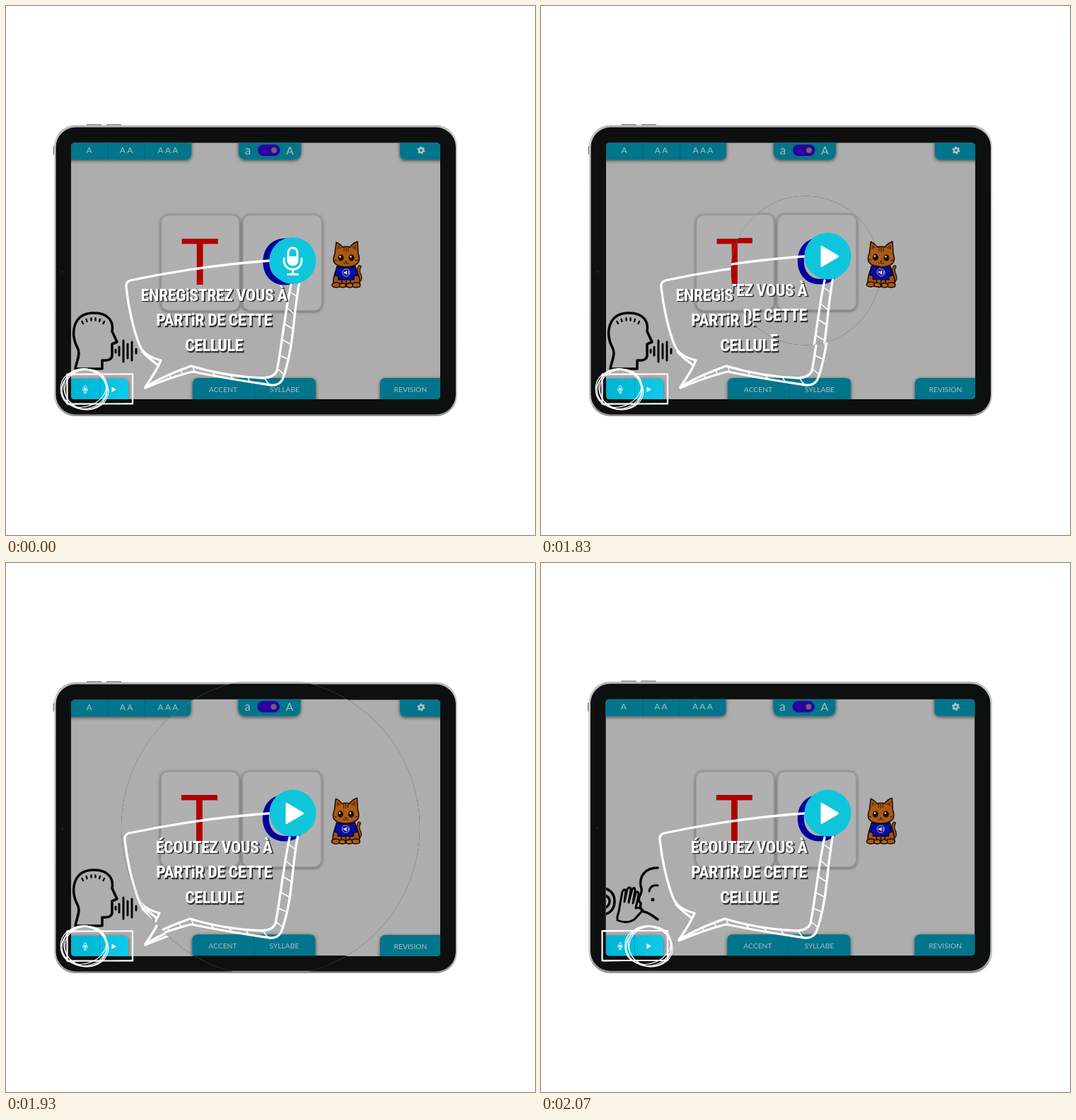
An HTML page for the animation above (3.96 s loop, 748 px wide and 748 px high).

```html
<!DOCTYPE html>
<html lang="fr">
<head>
<meta charset="utf-8">
<style>
html, body { margin: 0; width: 100%; height: 100%; overflow: hidden; background: #fff; }
svg { display: block; width: 100vw; height: 100vh; }
text { text-anchor: middle; }
.ui { font-family: Lato, sans-serif; fill: #b3b9ba; }
.big { font: 91px Lato, sans-serif; }
.line { fill: none; stroke: #fff; stroke-width: 3.3; stroke-linecap: round; stroke-linejoin: round; }
.ink { fill: none; stroke: #060606; stroke-width: 3.6; stroke-linecap: round; stroke-linejoin: round; }
.say { font-family: "Roboto Condensed", "Open Sans Condensed", "Noto Sans Condensed", Roboto, sans-serif; font-stretch: 75%; font-weight: 600; letter-spacing: -.02em; fill: #fff; }
.say .shade { fill: #303030; stroke: #303030; stroke-width: .6; }
</style>
</head>
<body>
<svg viewBox="0 0 748 748" xmlns="http://www.w3.org/2000/svg">
<defs>
  <filter id="soft" x="-20%" y="-20%" width="140%" height="150%">
    <feDropShadow dx="0" dy="1" stdDeviation="2.2" flood-color="#000" flood-opacity=".5"/>
  </filter>
  <filter id="deep" x="-20%" y="-30%" width="140%" height="170%">
    <feDropShadow dx="0" dy="1.5" stdDeviation="2.4" flood-color="#000" flood-opacity=".65"/>
  </filter>
  <linearGradient id="rim" x2="0" y2="1">
    <stop offset="0" stop-color="#b4bab6"/><stop offset=".06" stop-color="#c9cecb"/>
    <stop offset=".94" stop-color="#c2c6c3"/><stop offset="1" stop-color="#8c908e"/>
  </linearGradient>
  <linearGradient id="cyan" x2="1" y2="0">
    <stop offset="0" stop-color="#00b3d2"/><stop offset="1" stop-color="#0bcbe9"/>
  </linearGradient>
  <clipPath id="screen"><rect x="92" y="193.500" width="522" height="362.500" rx="5"/></clipPath>
  <clipPath id="wipe"><circle id="hole" cx="374" cy="374" r="0"/></clipPath>

  <g id="mic" fill="none" stroke="#fff" stroke-width="3" stroke-linecap="round">
    <rect x="-6.500" y="-18" width="13" height="24" rx="6.500"/>
    <path d="M-6-6H6V0A6 6 0 0 1-6 0Z" fill="#fff" stroke="none"/>
    <path d="M-12.500-3V0A12.500 12.500 0 0 0 12.500 0V-3M0 13V19M-7 19.500H7"/>
  </g>

  <g id="cat" stroke="#1c0d04" stroke-width="1.6" stroke-linejoin="round">
    <path d="M494 392Q504 388 500 380Q497 374 500 369" fill="none" stroke-width="5" stroke-linecap="round"/>
    <path d="M494 392Q504 388 500 380Q497 374 500 369" fill="none" stroke="#a05012" stroke-width="2.600" stroke-linecap="round"/>
    <path d="M468 370Q461 386 463 397H500Q502 386 494 370Z" fill="#a05012"/>
    <path d="M465 350L467 334Q472 336 476 341Q481 339 486 341Q491 335 497 333L498 350Q505 368 481 369Q457 368 465 350Z" fill="#ab5a14"/>
    <path d="M468 345L469 338L474 342ZM488 342L495 337V345Z" fill="#7c3208" stroke="none"/>
    <path d="M478 341V347M481 340V348M484 341V347M463 359L468 360M499 359L494 360" fill="none" stroke="#5b2605" stroke-width="1.300"/>
    <path d="M468 368Q481 372 494 368L497 381L492 382V387H470V382L465 381Z" fill="#0a0c9c" stroke="#06063e"/>
    <circle cx="481" cy="377" r="5.2" fill="none" stroke="#a9acc6" stroke-width="1"/>
    <path d="M478 376H480L482 374V380L480 378H478Z" fill="#ddd" stroke="#ddd" stroke-width=".6"/>
    <path d="M484 374.5Q485.5 377 484 379.5" fill="none" stroke="#ddd" stroke-width=".9"/>
    <g fill="#150b06" stroke="none">
      <ellipse cx="473.500" cy="356" rx="4" ry="4.600"/><ellipse cx="488.500" cy="356" rx="4" ry="4.600"/>
      <path d="M479 360.500H483L481 362.500Z"/>
    </g>
    <g fill="#c5c5c5" stroke="none"><circle cx="472.500" cy="354.500" r="1.400"/><circle cx="487.500" cy="354.500" r="1.400"/></g>
    <path d="M477 363Q479 366 481 363Q483 366 485 363" fill="none" stroke-width=".9"/>
    <path d="M475 387V395M487 387V395M481 388V396" fill="none"/>
    <ellipse cx="467" cy="394.500" rx="6" ry="3.500" fill="#ab5a14"/><ellipse cx="495" cy="394.500" rx="6" ry="3.500" fill="#ab5a14"/>
    <ellipse cx="476" cy="395" rx="4.500" ry="3" fill="#b8681e"/><ellipse cx="486" cy="395" rx="4.500" ry="3" fill="#b8681e"/>
  </g>

  <g id="tablet">
    <path d="M114 168H135M142 168H163" stroke="#8c908e" stroke-width="2"/>
    <path d="M67.500 198V210" stroke="#777" stroke-width="1.500"/>
    <rect x="68" y="168.500" width="570" height="411.500" rx="30" fill="url(#rim)"/>
    <rect x="70.500" y="171.500" width="565.500" height="406" rx="28" fill="#0e1010"/>
    <circle cx="80" cy="375.500" r="2" fill="#0d2420"/>
    <g clip-path="url(#screen)">
      <rect x="92" y="193" width="522" height="363" fill="#adadad"/>
      <g filter="url(#soft)" fill="#b0b0b0" stroke="#959595" stroke-width="1.500">
        <rect x="219.500" y="295.500" width="110.500" height="135" rx="10"/>
        <rect x="335" y="295.500" width="111.500" height="135" rx="10"/>
      </g>
      <g filter="url(#deep)" fill="#01758c">
        <path d="M80 180H262V209Q262 217 254 217H80Z"/>
        <path d="M329 180H417V206Q417 217 406 217H340Q329 217 329 206Z"/>
        <path d="M557 180H630V217H565Q557 217 557 209Z"/>
        <path d="M264 570V534Q264 526 272 526H430Q438 526 438 534V570Z"/>
        <path d="M529 570V534Q529 526 537 526H630V570Z"/>
      </g>
      <path d="M144.500 193V217M196.500 193V217M351.500 526V556" stroke="#04647a"/>
      <rect x="356" y="196" width="31.500" height="16" rx="8" fill="#2c009c"/>
      <circle cx="379" cy="204" r="4" fill="#705f77"/>
      <g class="ui" font-size="12">
        <text x="117.500" y="208">A</text><text x="170" y="208">A A</text><text x="229" y="208">A A A</text>
        <text x="342" y="209.500" font-size="17">a</text><text x="401.500" y="209.500" font-size="16">A</text>
        <g font-size="10.300">
          <text x="307" y="546.300">ACCENT</text><text x="394" y="546.300">SYLLABE</text><text x="572" y="546.300">REVISION</text>
        </g>
      </g>
      <circle cx="587" cy="204" r="3" fill="none" stroke="#b9c0c1" stroke-width="2.400"/>
      <circle cx="587" cy="204" r="4.600" fill="none" stroke="#b9c0c1" stroke-width="1.800" stroke-dasharray="2.400 2.417"/>
      <text class="big" x="274" y="394.300" fill="#b00000">T</text>
      <text class="big" x="389.500" y="394.300" fill="#00009c">C</text>
      <use href="#cat"/>
    </g>
  </g>

  <g id="bubble" class="line">
    <path d="M388 359Q280 366 176 388Q169 390 170 398C173 425 180 458 189 480Q195 495 219 501Q214 514 197 539Q220 524 262 509Q310 524 364 526Q379 525 383 516C390 480 395 430 403 394"/>
    <path d="M415 390C408 425 407 460 402 486Q397 513 391 528Q386 537 375 536Q318 528 264 517Q232 525 197 540M193 489Q204 500 215 508"/>
    <path d="M403 405L413 412M399 428L408 436M395 450L406 457M391 472L402 478M387 494L398 499M384 513L393 521M366 527L372 535M342 526L345 531M318 523L322 528M292 517L296 523M264 510L267 517M246 515L250 520M230 522L234 526" stroke-width="1.500"/>
  </g>

  <g id="keys">
    <path d="M92 527H166Q173 527 173 534V556H97Q92 556 92 551Z" fill="url(#cyan)" filter="url(#soft)"/>
    <path d="M132.500 527V556" stroke="#0a9dba"/>
    <use href="#mic" transform="translate(112 542) scale(.27)"/>
    <path d="M149.500 538.500L156 542.300L149.500 546Z" fill="#fff"/>
    <path d="M86 520.500H179V562.500H86.500V520" fill="none" stroke="#fff" stroke-width="2.200"/>
    <path d="M85 522L180 520M87 564L178 561.500" stroke="#fff" stroke-opacity=".6"/>
  </g>

  <g id="ring" fill="none" stroke="#fff" stroke-width="1.200"></g>
</defs>

<g id="record">
  <use href="#tablet"/>
  <g class="ink">
    <path d="M136 513H98C100 501 106 492 101 483C90 463 95 434 124 434C147 434 152 448 150 460L157 475L150 478V494Q150 502 136 501Z"/>
    <path d="M109 449L107.500 446M114.500 446L113.500 443M120.500 444.500V441.500M126.500 444.500V441.500M132 446L133 443M137.500 449L139 446" stroke-width="2.400"/>
    <path d="M155 486V490M160 482V494M166 473V503M172 478V498M178 475V501M184 485V491" stroke-width="3"/>
  </g>
  <use href="#bubble"/>
  <g class="say" data-lines="ENREGiSTREZ VOUS À|PARTiR DE CETTE|CELLULE" data-y="408"></g>
  <circle cx="405.500" cy="360" r="33" fill="#0fc5dc"/>
  <use href="#mic" transform="translate(405.500 360)"/>
  <use href="#keys"/>
  <use href="#ring" x="111" y="541.500"/>
</g>

<g id="listen" clip-path="url(#wipe)">
  <use href="#tablet" transform="translate(-.6 -.8)"/>
  <g class="ink" clip-path="url(#screen)">
    <path d="M165 431C147 431 139 443 141 457Q144 463 140 470Q136 477 141 481Q139 490 145 493Q152 494 165 504" stroke-width="3.500"/>
    <path d="M165 456Q155 454 153 464" stroke-width="3"/>
    <circle cx="158" cy="476" r="1" stroke-width="3"/>
    <path d="M108 500Q111 490 112 481L115 465Q118 459 120 464L118 479L122 461Q126 456 127 462L124 480L129 461Q133 457 133 463L130 481L134 466Q138 463 138 469L134 488Q141 486 144 491L132 504Q121 511 108 505Z" stroke-width="3"/>
    <path d="M90 460Q104 464 104 478Q104 493 90 497M90 470Q97 472 97 478Q97 485 90 488" stroke-width="3.500"/>
  </g>
  <use href="#bubble" x="-2" y="-6"/>
  <g class="say" data-lines="ÉCOUTEZ VOUS À|PARTiR DE CETTE|CELLULE" data-y="401"></g>
  <circle cx="405.500" cy="353.500" r="33" fill="#0fc5dc"/>
  <path d="M395.500 340.500Q395.500 338 398 339.500L420 352.500Q422 354 420 355.500L398 368.500Q395.500 370 395.500 367.500Z" fill="#fff"/>
  <use href="#keys" y="-.5"/>
  <use href="#ring" x="152.500" y="541.500"/>
</g>
</svg>
<script>
const LOOP = 3960, START = 1730, END = 2070, SPEED = 1.055;
const STEPS = [1730, 1770, 1800, 1830, 1870, 1900, 1930, 1970, 2000, 2030, 2070];
const hole = document.getElementById('hole');

// Loose hand-drawn loops
const loops = [[32, 28, 0, 0, -8], [34, 28, 0, 1, 12], [31, 28, 1, 0, 30], [33, 26, -1, -1, -20], [30, 28, 2, 1, 5]];
document.getElementById('ring').innerHTML = loops.map(([rx, ry, x, y, a]) =>
  `<ellipse rx="${rx}" ry="${ry}" transform="translate(${x} ${y}) rotate(${a})"/>`).join('');

// Captions: a dark offset copy under each white line, centred on its row
const says = [...document.querySelectorAll('.say')];
for (const say of says) {
  const top = +say.dataset.y;
  say.innerHTML = say.dataset.lines.split('|').map((line, i) => {
    const y = top + i * 35.7;
    return `<text class="shade" x="295.500" y="${y + 1.8}" dy=".36em">${line}</text>` +
      `<text x="294" y="${y}" dy=".36em">${line}</text>`;
  }).join('');
  say.style.fontSize = '28px';
}
const wide = says[0].querySelector('text').getComputedTextLength();
const size = Math.min(28, 28 * 207 / wide);
for (const say of says) say.style.fontSize = size + 'px';

function radius(t) {
  if (t < START) return 0;
  if (t >= END) return 600;
  const step = STEPS.filter(s => s <= t).pop();
  return (step - START) * SPEED;
}

function draw(now) {
  hole.setAttribute('r', radius(now % LOOP));
  requestAnimationFrame(draw);
}
draw(0);
</script>
</body>
</html>
```
